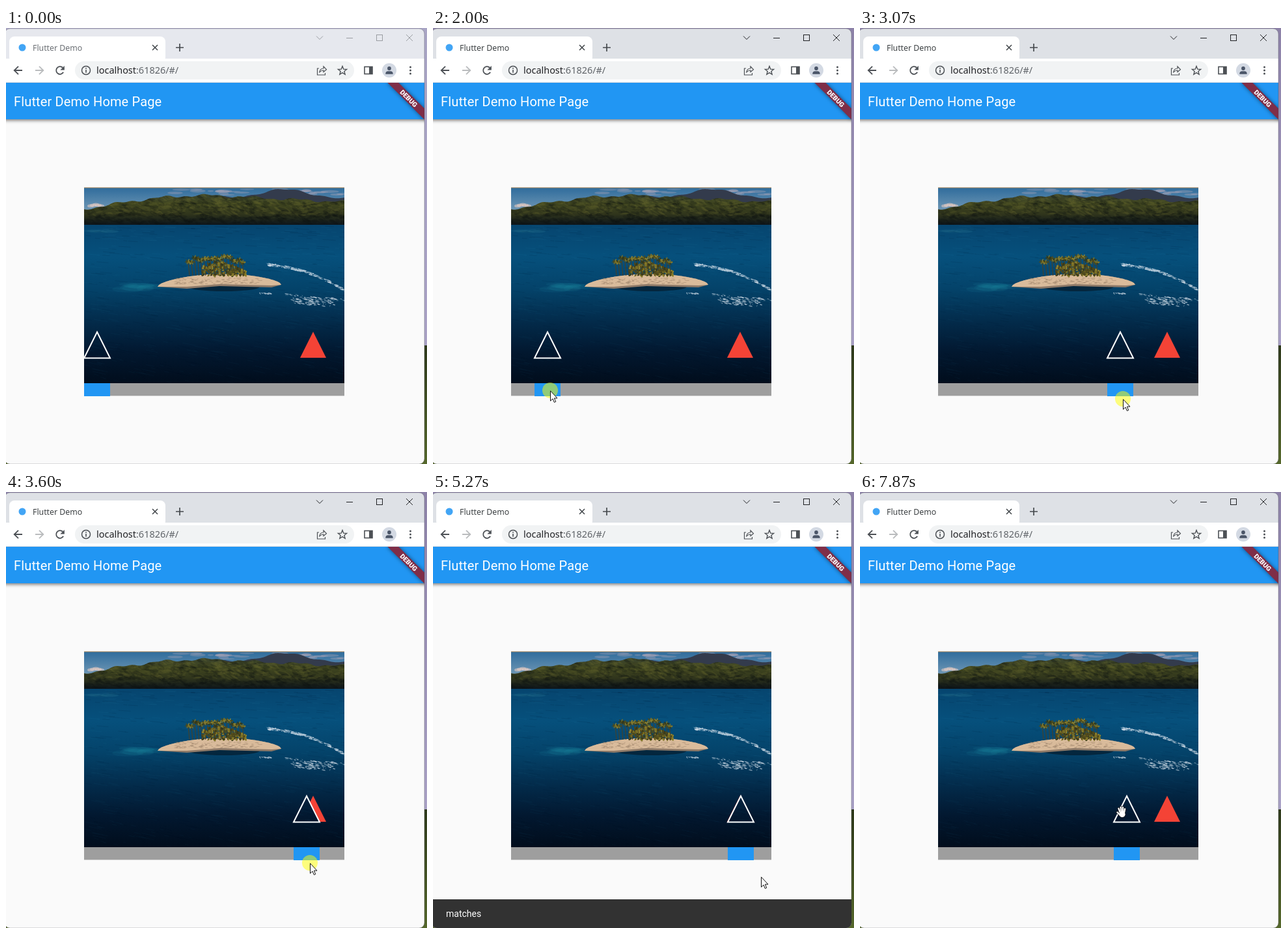
Write an HTML page with a canvas that moves like this. It is 647 px wide and 669 px high and loops after 8 s.

```html
<!DOCTYPE html>
<html lang="en">
<head>
<meta charset="utf-8">
<title>Slider puzzle</title>
<style>
html, body { margin: 0; width: 100%; height: 100%; overflow: hidden; background: #fafafa; }
canvas { display: block; }
</style>
</head>
<body>
<canvas id="stage" width="647" height="669"></canvas>
<script>
const W = 647, H = 669, LOOP = 8000, STEP = 1000 / 15;
const PHOTO = { x: 120, y: 245, w: 400, h: 300 };
const HOME = 120, GOAL = 452, SOLVED = 453;
const ENTER = 190, PRESS = 1710, RELEASE = 4725, GRAB = 6530, DROP = 7260;
const BLUE = '#2196f3';

// Pointer moves: start, end, x, y and how strongly the move slows down
const MOVES = [
  [ENTER, 990, 149, 547, 2],
  [1000, 1250, 136, 552, 1],
  [1250, 1520, 144, 556, 1],
  [1790, 2000, 180, 556, 1],
  [2000, 2470, 259, 568, 1],
  [2470, 3854, 474, 569, 2],
  [4270, 4460, 477, 570, 1],
  [4690, 5070, 504, 590, 1],
  [5330, 5990, 475, 557, 1],
  [6470, 6930, 412, 557, 1],
  [7200, 7870, 402, 491, 1]
];

const { sin, cos, exp, abs, floor, round, min, max, PI } = Math;
const clamp = v => max(0, min(1, v));
const ctx = document.getElementById('stage').getContext('2d');

function layer(w, h, draw) {
  const c = document.createElement('canvas');
  c.width = w;
  c.height = h;
  draw(c.getContext('2d'));
  return c;
}

function rng(seed) {
  return () => (seed = (seed * 16807) % 2147483647) / 2147483647;
}

function rect(g, color, x, y, w, h) {
  g.fillStyle = color;
  g.fillRect(x, y, w, h);
}

function poly(g, pts, close) {
  g.beginPath();
  pts.forEach(([x, y]) => g.lineTo(x, y));
  if (close) g.closePath();
}

function shape(g, color, pts) {
  poly(g, pts, true);
  g.fillStyle = color;
  g.fill();
}

function line(g, color, width, ...pts) {
  poly(g, pts);
  g.strokeStyle = color;
  g.lineWidth = width;
  g.stroke();
}

function oval(g, color, x, y, rx, ry = rx, turn = 0) {
  g.beginPath();
  g.ellipse(x, y, rx, ry, turn, 0, 7);
  g.fillStyle = color;
  g.fill();
}

function text(g, str, x, y, font, color) {
  g.font = font;
  g.fillStyle = color;
  g.fillText(str, x, y);
}

// Vertical gradient through evenly spaced colours
function gradient(g, y0, y1, ...colors) {
  const fill = g.createLinearGradient(0, y0, 0, y1);
  colors.forEach((c, i) => fill.addColorStop(i / (colors.length - 1), c));
  return fill;
}

function curve(x0, x1, step, f) {
  const pts = [];
  for (let x = x0; x <= x1; x += step) pts.push([x, f(x)]);
  return pts;
}

// ---- photo, in its own 400 x 300 space ----

const SHORE = 57;
const peak = x => 16 - 14 * exp(-(((x - 308) / 45) ** 2)) - 5 * exp(-(((x - 190) / 25) ** 2)) + sin(x / 6);
const ridge = x => 33 - 21 * sin(clamp(x / 185) * PI / 2) + 10 * clamp((x - 200) / 200) + 1.6 * sin(x / 11) + sin(x / 4.3);

function drawSea(g, rnd) {
  rect(g, gradient(g, SHORE, 300, '#06456f', '#06507c', '#04436a', '#032c4c', '#021830', '#010d1c'), 0, SHORE, 400, 243);
  for (let i = 0; i < 700; i++) {
    const x = rnd() * 400, y = SHORE + 2 + rnd() * 240, len = 4 + rnd() * 18;
    const tone = rnd() > 0.5 ? '40,130,165' : '0,8,25';
    line(g, `rgba(${tone},${0.12 - y * 0.00025})`, 1, [x, y], [x + len, y + len * y * 0.0008]);
  }
  for (let i = 0; i < 10; i++) {
    oval(g, 'rgba(35,150,165,.1)', 65 + rnd() * 60, 148 + rnd() * 9, 10 + rnd() * 22, 2 + rnd() * 3);
    oval(g, 'rgba(70,150,170,.06)', 8 + rnd() * 35, 64 + rnd() * 5, 14, 2);
  }
}

function drawLand(g, rnd) {
  rect(g, gradient(g, 0, 35, '#2f6c9c', '#6f97b5'), 0, 0, 400, 40);
  for (let i = 0; i < 26; i++) {
    oval(g, 'rgba(205,180,190,.28)', 130 + rnd() * 270, 2 + rnd() * 9, 4 + rnd() * 12, 1 + rnd() * 1.5);
  }
  for (let i = -2; i < 3; i++) oval(g, 'rgba(235,205,195,.55)', 18 + i * 4, 28 - abs(2 - abs(i)), 5, 2.5);
  const mass = f => [...curve(0, 400, 2, f), [400, SHORE], [0, SHORE]];
  shape(g, '#333b4c', mass(x => x < 130 ? 45 : peak(x)));
  g.save();
  poly(g, mass(ridge), true);
  g.clip();
  rect(g, gradient(g, 8, SHORE, '#39422e', '#40461f', '#30351c', '#0d151b'), 0, 0, 400, SHORE);
  for (let i = 0; i < 900; i++) {
    const x = rnd() * 400, y = 10 + rnd() * 46;
    const tone = rnd() > 0.5 && y < 42 ? '104,104,48' : '14,19,18';
    oval(g, `rgba(${tone},.2)`, x, y, 2 + rnd() * 7, 0.8 + rnd() * 1.6, rnd() - 0.3);
  }
  g.restore();
}

function drawIsland(g, rnd) {
  oval(g, 'rgba(4,20,34,.6)', 215, 152, 55, 7);
  const left = 113, width = 190;
  const sand = drop => {
    const along = x => (x - left) / width;
    const top = curve(left, left + width, 2, x => 152 - along(x) * 3 - 18 * sin(PI * clamp(along(x))) ** 0.55);
    return [...top, [left + width - 15, 150 + drop], [left + 95, 148 + drop], [left + 45, 152 + drop]];
  };
  shape(g, '#8f7a68', sand(3));
  shape(g, '#d9bb9b', sand(0));
  for (let i = 0; i < 120; i++) {
    oval(g, 'rgba(120,95,75,.3)', 140 + rnd() * 135, 138 + rnd() * 10, 1 + rnd() * 2, 0.6);
  }
  const greens = ['#7b7124', '#4f4b1b', '#8f8230', '#363a1b'];
  const palm = (x, y, size) => {
    line(g, '#4d4122', 1, [x + 2, 135], [x, y]);
    for (let a = 0; a < 7; a++) {
      oval(g, greens[floor(rnd() * 4)], x + cos(a) * size, y + sin(a) * size * 0.7, size, 0.9, a);
    }
  };
  for (let i = 0; i < 240; i++) {
    const x = 182 + rnd() * 66, rise = 24 - abs(x - 206) * 0.4;
    oval(g, greens[i % 4], x, 135 - rnd() * rise, 1 + rnd() * 2.5, 0.8 + rnd() * 1.2, rnd() * 3);
  }
  for (let i = 0; i < 18; i++) {
    const x = 160 + i * 4.9;
    palm(x, 103 + rnd() * 9 + abs(x - 205) * 0.12, 2.6);
  }
}

function drawFoam(g, rnd) {
  const streak = (x0, y0, x1, y1, sag, n, spread) => {
    for (let i = 0; i < n; i++) {
      const k = rnd(), x = x0 + (x1 - x0) * k;
      const y = y0 + (y1 - y0) * k - sin(k * PI) * sag + (rnd() - 0.5) * spread;
      oval(g, `rgba(215,225,235,${0.2 + rnd() * 0.6})`, x, y, 0.6 + rnd() * 3, 0.3 + rnd() * 0.6, 0.25);
    }
  };
  streak(282, 118, 400, 157, 8, 170, 4);
  streak(310, 164, 400, 172, -1, 60, 4);
  streak(320, 173, 385, 178, 0, 90, 10);
  streak(268, 162, 288, 163, 0, 16, 2);
}

const photo = layer(PHOTO.w, PHOTO.h, g => {
  const rnd = rng(4711);
  [drawLand, drawSea, drawIsland, drawFoam].forEach(draw => draw(g, rnd));
});

// ---- browser window ----

function windowPath(g) {
  g.beginPath();
  g.roundRect(-2, 1, 645, 668, 8);
}

function drawCross(g, color, width, x, y, r) {
  line(g, color, width, [x - r, y - r], [x + r, y + r]);
  line(g, color, width, [x + r, y - r], [x - r, y + r]);
}

function drawTabs(g, active) {
  const ink = active ? '#202124' : '#9a9da2', mark = '#45494d';
  rect(g, active ? '#dee1e6' : '#e6e8ee', 0, 0, 643, 47);
  g.fillStyle = '#fff';
  g.beginPath();
  g.roundRect(5, 13, 240, 40, 8);
  g.fill();
  oval(g, '#42a5f5', 25, 30, 5.5);
  text(g, 'Flutter Demo', 41, 35, '12.3px "Noto Sans", sans-serif', active ? '#3c4043' : '#6b6f74');
  drawCross(g, mark, 1.6, 229, 30, 4);
  line(g, mark, 1.7, [261, 30], [273, 30]);
  line(g, mark, 1.7, [267, 24], [267, 36]);
  line(g, ink, 1, [477, 12.5], [482, 17.5], [487, 12.5]);
  line(g, ink, 1, [523, 15.5], [533, 15.5]);
  g.strokeRect(569.5, 10.5, 9, 9);
  drawCross(g, ink, 1, 620, 15, 5);
}

function drawArrow(g, x, dir, color) {
  line(g, color, 1.8, [x - 6.5 * dir, 65], [x + 6 * dir, 65]);
  line(g, color, 1.8, [x, 58.8], [x - 6.3 * dir, 65], [x, 71.2]);
}

function drawToolbar(g) {
  const ink = '#4d5156';
  rect(g, '#fff', 0, 47, 643, 36);
  rect(g, '#dadce0', 0, 83, 643, 1);
  g.fillStyle = '#f1f3f4';
  g.beginPath();
  g.roundRect(106, 51, 429, 28, 14);
  g.fill();
  drawArrow(g, 19, 1, ink);
  drawArrow(g, 51, -1, '#babcbe');

  g.strokeStyle = ink;
  g.lineWidth = 1.8;
  g.beginPath();
  g.arc(83, 65, 5.8, 0.5, 5.5);
  g.stroke();
  shape(g, ink, [[89.8, 58], [89.8, 64.4], [83.4, 64.4]]);

  g.lineWidth = 1.5;
  g.beginPath();
  g.arc(123, 65, 6.5, 0, 7);
  g.stroke();
  rect(g, ink, 122.2, 64, 1.6, 4.6);
  rect(g, ink, 122.2, 61, 1.6, 1.7);

  const font = '14.45px "Noto Sans", sans-serif';
  text(g, 'localhost', 139, 70, font, '#202124');
  text(g, ':61826/#/', 139 + g.measureText('localhost').width, 70, font, '#5f6368');

  line(g, ink, 1.2, [481, 62], [478.5, 62], [478.5, 72], [490.5, 72], [490.5, 69]);
  g.beginPath();
  g.moveTo(481.5, 68.5);
  g.quadraticCurveTo(482.5, 62, 488, 62);
  g.lineTo(488, 59);
  g.lineTo(492.5, 63.6);
  g.lineTo(488, 67.5);
  g.lineTo(488, 65);
  g.quadraticCurveTo(484, 65, 481.5, 68.5);
  g.stroke();

  const star = Array.from({ length: 10 }, (_, i) => {
    const r = i % 2 ? 3 : 7, a = i * PI / 5;
    return [517 + r * sin(a), 65.6 - r * cos(a)];
  });
  poly(g, star, true);
  g.lineWidth = 1.4;
  g.stroke();

  g.lineWidth = 1.6;
  g.strokeRect(551, 59.5, 12, 11);
  rect(g, ink, 558, 59, 5, 12);

  oval(g, '#d3d9e3', 589, 65, 11);
  oval(g, '#4a5568', 589, 62, 2.9);
  g.beginPath();
  g.roundRect(583.3, 66.2, 11.4, 4.6, [4, 4, 0, 0]);
  g.fill();
  for (let i = -1; i < 2; i++) oval(g, ink, 621.5, 65 + i * 5, 1.5);
}

function drawBanner(g) {
  g.save();
  g.beginPath();
  g.rect(0, 84, 643, 585);
  g.clip();
  g.translate(643, 84);
  g.rotate(PI / 4);
  g.shadowColor = 'rgba(0,0,0,.5)';
  g.shadowBlur = 6;
  rect(g, '#7f2e48', -40, 28, 80, 12);
  g.shadowColor = 'transparent';
  g.textAlign = 'center';
  text(g, 'DEBUG', 0, 37.7, '900 10.2px Roboto, sans-serif', '#fff');
  g.restore();
}

function drawPage(g) {
  rect(g, '#fafafa', 0, 84, 643, 585);
  g.save();
  g.shadowColor = 'rgba(0,0,0,.5)';
  g.shadowBlur = 5;
  g.shadowOffsetY = 2;
  rect(g, BLUE, -10, 90, 663, 50);
  g.restore();
  rect(g, BLUE, 0, 84, 643, 56);
  g.letterSpacing = '0.15px';
  text(g, 'Flutter Demo Home Page', 12, 120, '20px Roboto, sans-serif', '#fff');
  g.letterSpacing = '0px';
  drawBanner(g);
  g.drawImage(photo, PHOTO.x, PHOTO.y);
  rect(g, '#b08a5c', PHOTO.x, PHOTO.y - 0.5, PHOTO.w, 1);
  shape(g, '#f44336', triangle(GOAL, 466));
  rect(g, '#9e9e9e', PHOTO.x, 545, PHOTO.w, 19.4);
}

const scene = active => layer(W, H, g => {
  rect(g, gradient(g, 0, 486, active ? '#8d82a8' : '#a9a5c5', '#aaa2c6'), 0, 0, W, 487);
  rect(g, gradient(g, 487, H, '#2f3a1c', '#56682c'), 0, 487, W, H - 487);
  g.save();
  windowPath(g);
  g.clip();
  drawTabs(g, active);
  drawToolbar(g);
  drawPage(g);
  g.restore();
  windowPath(g);
  g.strokeStyle = 'rgba(70,70,80,.35)';
  g.lineWidth = 1;
  g.stroke();
});

// ---- moving parts ----

function triangle(x, y) {
  return [[x + 20, y], [x + 40, y + 40], [x, y + 40]];
}

function drawPiece(x) {
  const outline = triangle(x, 466.5);
  ctx.save();
  ctx.beginPath();
  ctx.rect(PHOTO.x - 1, PHOTO.y, PHOTO.w + 2, PHOTO.h);
  ctx.clip();
  ctx.save();
  poly(ctx, outline, true);
  ctx.clip();
  ctx.drawImage(photo, PHOTO.x + x - GOAL, PHOTO.y);
  ctx.restore();
  poly(ctx, outline, true);
  ctx.strokeStyle = '#fff';
  ctx.lineWidth = 2;
  ctx.stroke();
  ctx.restore();
}

function drawPointer(x, y) {
  ctx.save();
  ctx.translate(x, y);
  shape(ctx, '#fff', [[0.5, 0.8], [0.5, 16.2], [4, 12.9], [6.4, 18.4], [8.7, 17.4], [6.4, 12], [11, 12]]);
  ctx.strokeStyle = '#111';
  ctx.lineWidth = 1;
  ctx.stroke();
  ctx.restore();
}

function drawHand(x, y) {
  ctx.save();
  ctx.translate(x, y);
  ctx.lineCap = 'round';
  for (const [color, grow] of [['#111', 1.4], ['#fff', 0]]) {
    for (let i = 0; i < 4; i++) {
      const reach = 7.5 - (i - 1.4) ** 2 * 1.1;
      line(ctx, color, 2.4 + grow, [-4.5 + i * 3.2, -reach], [-2 + i * 2, 1]);
    }
    line(ctx, color, 2.4 + grow, [-6.5, 0.5], [-2.5, 4.5]);
    oval(ctx, color, 1, 3.6, 4.6 + grow / 2, 4.4 + grow / 2);
  }
  ctx.restore();
}

function drawSnackbar(v) {
  if (v <= 0) return;
  const top = 673 - 48 * ease(v);
  ctx.save();
  windowPath(ctx);
  ctx.clip();
  rect(ctx, '#323232', 0, top, 643, 48);
  ctx.globalAlpha = clamp((v - 0.4) / 0.6);
  text(ctx, 'matches', 20, top + 27, '14px Roboto, sans-serif', '#fff');
  ctx.restore();
}

// cubic-bezier(.4, 0, .2, 1)
function ease(v) {
  let lo = 0, hi = 1;
  for (let i = 0; i < 20; i++) {
    const s = (lo + hi) / 2, r = 1 - s;
    if (1.2 * r * r * s + 0.6 * r * s * s + s * s * s < v) lo = s; else hi = s;
  }
  return lo * lo * (3 - 2 * lo);
}

function pointerAt(t) {
  let x = 575, y = 655;
  for (const [from, to, tx, ty, slow] of MOVES) {
    const k = 1 - (1 - clamp((t - from) / (to - from))) ** slow;
    x += (tx - x) * k;
    y += (ty - y) * k;
  }
  return [x, y];
}

function sliderAt(t, x) {
  if (t < PRESS) return HOME;
  if (t < RELEASE) return round(x - 24.4);
  if (t < GRAB) return SOLVED;
  return round(min(t < DROP ? x : 412, 475) - 22);
}

const idle = scene(false), focused = scene(true);

function render(time) {
  const t = floor((time % LOOP + 8) / STEP) * STEP + 0.01;
  const [px, py] = pointerAt(t);
  const x = round(px), y = round(py), slider = sliderAt(t, px);
  ctx.drawImage(t < PRESS ? idle : focused, 0, 0);
  drawPiece(slider);
  rect(ctx, BLUE, slider, 545, 40, 20);
  drawSnackbar(min(clamp((t - 4700) / 250), clamp((6240 - t) / 250)));

  if (t < ENTER) return;
  if ((t > PRESS && t < RELEASE) || (t > GRAB && t < DROP)) oval(ctx, 'rgba(255,255,0,.5)', x, y, 12);
  if (y < 507) drawHand(x, y);
  else drawPointer(x, y);
}

function tick() {
  render(performance.now());
  requestAnimationFrame(tick);
}
tick();
</script>
</body>
</html>
```
